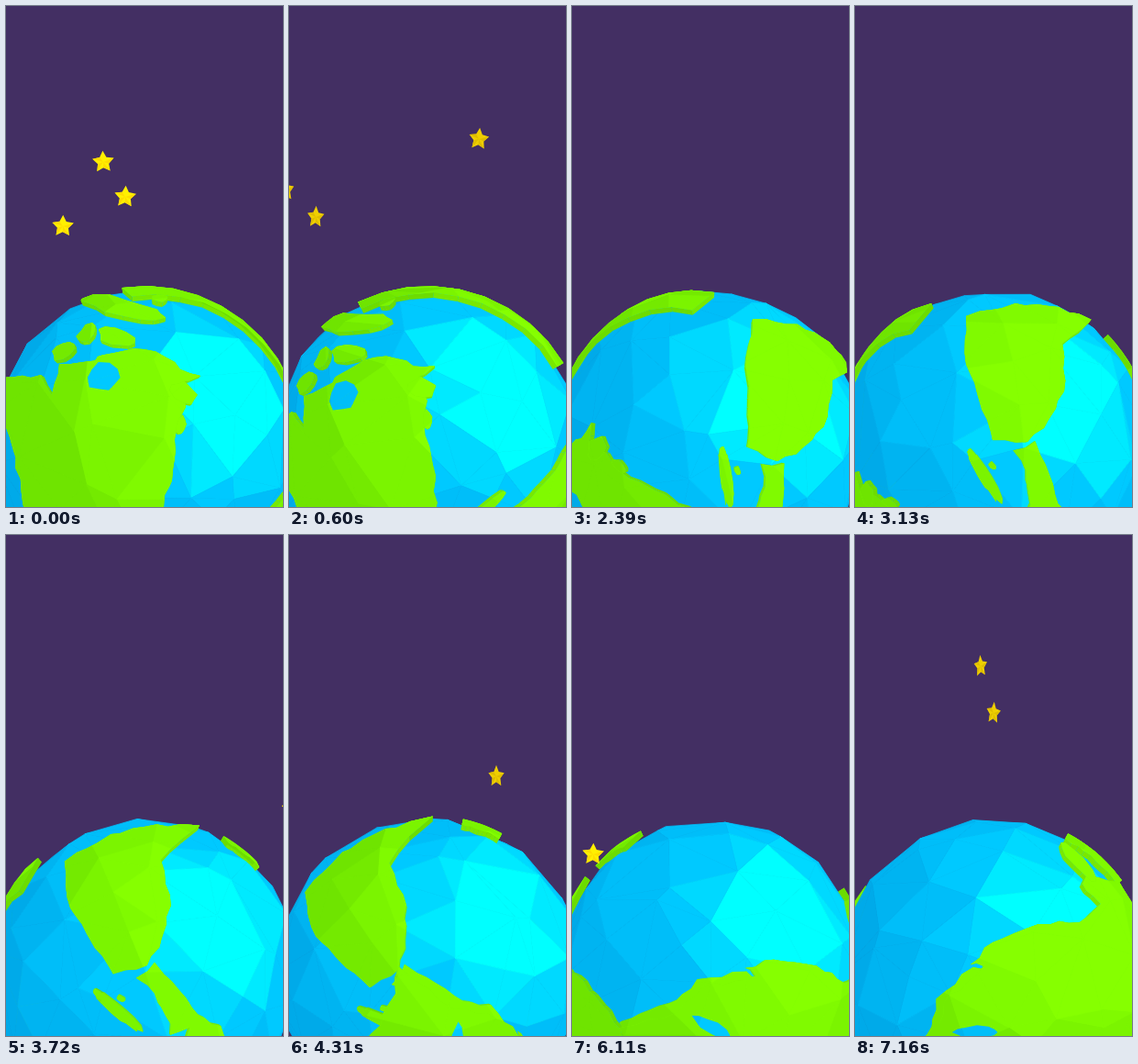
Write an HTML page with a canvas that moves like this. It is 302 by 546 pixels and loops after 7.26 s.

```html
<!DOCTYPE html>
<html lang="en">
<head>
<meta charset="utf-8">
<title>Spinning globe</title>
<style>
html, body { margin: 0; width: 100%; height: 100%; overflow: hidden; background: #432f63; }
canvas { display: block; width: 302px; height: 546px; }
</style>
</head>
<body>
<canvas id="stage" width="302" height="546"></canvas>
<script>
const ctx = document.getElementById('stage').getContext('2d');
const LOOP = 7260, SPIN = 0.0006004, REACH = 3200;
const CX = 151, CY = 478, SEA = 169, LAND = 173;
const AXIS = [0, -0.53, 0.848], LIGHT = [0.53, 0.36, 0.77];

const SEA_TONES = [[0.92, '#00ffff'], [0.86, '#00eaff'], [0.78, '#00d9ff'], [0.62, '#00c9ff'],
  [0.32, '#00bef9'], [0, '#00b4f1'], [-9, '#00aae9']];
const LAND_TONES = [[0.82, '#86ff00'], [0.7, '#80fa00'], [0.5, '#7bf400'], [0.3, '#74ea00'], [-9, '#6fe400']];

let seed = 11;
const rand = () => (seed = (seed * 16807) % 2147483647) / 2147483647;
const wobble = size => (rand() - 0.5) * size;
const range = n => [...Array(n).keys()];
const dot = (a, b) => a[0] * b[0] + a[1] * b[1] + a[2] * b[2];
const cross = (a, b) => [a[1] * b[2] - a[2] * b[1], a[2] * b[0] - a[0] * b[2], a[0] * b[1] - a[1] * b[0]];
const sub = (a, b) => a.map((v, i) => v - b[i]);
const unit = a => { const l = Math.hypot(...a); return a.map(v => v / l); };
const tone = (tones, d) => tones.find(t => d > t[0])[1];

function turn(p, angle) {
  const c = Math.cos(angle), s = Math.sin(angle), k = dot(AXIS, p) * (1 - c), q = cross(AXIS, p);
  return p.map((v, i) => v * c + q[i] * s + AXIS[i] * k);
}

// Convex hull of jittered points: the facets of the globe
function facets(count, jitter) {
  const faces = [];
  const pts = range(count).map(i => {
    const y = 1 - 2 * (i + 0.5) / count, r = Math.sqrt(1 - y * y), a = i * 2.39996;
    return unit([r * Math.cos(a), y, r * Math.sin(a)].map(v => v + wobble(jitter)));
  });
  for (let i = 0; i < count; i++)
    for (let j = i + 1; j < count; j++) {
      if (dot(pts[i], pts[j]) < 0.4) continue;
      for (let k = j + 1; k < count; k++) {
        if (dot(pts[i], pts[k]) < 0.4) continue;
        let n = unit(cross(sub(pts[j], pts[i]), sub(pts[k], pts[i])));
        if (dot(n, pts[i]) < 0) n = n.map(v => -v);
        const d = dot(n, pts[i]) + 1e-9;
        if (pts.every(p => dot(n, p) <= d)) faces.push({ n, pts: [pts[i], pts[j], pts[k]] });
      }
    }
  return faces;
}
const mesh = facets(105, 0.24);

// Lifts a screen outline, as seen at a given time, onto the sphere
function lift(at, outline) {
  const pts = outline.map(([x, y]) => {
    const a = (x - CX) / LAND, b = (CY - y) / LAND;
    return turn(unit([a, b, Math.sqrt(Math.max(0, 1 - a * a - b * b))]), -SPIN * at);
  });
  return { at, pts };
}

// Ragged coast through a few key points
function coast(at, ...keys) {
  const outline = [];
  keys.forEach(([x, y], i) => {
    const [u, v] = keys[(i + 1) % keys.length];
    const parts = Math.ceil(Math.hypot(u - x, v - y) / 14);
    outline.push([x, y]);
    for (let j = 1; j < parts; j++)
      outline.push([x + (u - x) * j / parts + wobble(5), y + (v - y) * j / parts + wobble(5)]);
  });
  return lift(at, outline);
}

// Ragged ellipse
function isle(at, x, y, long, short, tilt = 0) {
  const n = Math.round(7 + long / 5);
  return lift(at, range(n).map(i => {
    const a = i / n * 2 * Math.PI, r = 1 + wobble(0.4);
    const u = Math.cos(a) * long * r, v = Math.sin(a) * short * r;
    return [x + u * Math.cos(tilt) - v * Math.sin(tilt), y + u * Math.sin(tilt) + v * Math.cos(tilt)];
  }));
}

// Thin land along the horizon between two angles in degrees
function edge(at, from, to, depth) {
  const n = 10;
  const arc = r => range(n).map(i => {
    const a = (from + (to - from) * i / (n - 1)) * Math.PI / 180;
    const d = r * (1 + wobble(0.012));
    return [CX + Math.cos(a) * d, CY - Math.sin(a) * d];
  });
  return lift(at, [...arc(LAND * (1 - depth)), ...arc(LAND * 1.02).reverse()]);
}

const lands = [
  coast(0, [-5, 405], [38, 402], [50, 424], [58, 390], [84, 388], [118, 378], [150, 374], [184, 388], [190, 396],
    [212, 403], [194, 409], [196, 437], [186, 462], [182, 505], [172, 546], [150, 620], [40, 600], [18, 540], [4, 470]),
  isle(0, 125, 327, 50, 9, 0.25),
  isle(0, 62, 375, 14, 8, -0.5),
  isle(0, 88, 356, 13, 7, -0.7),
  isle(0, 120, 361, 20, 9, 0.3),
  isle(0, 98, 396, 14, 4, 1.9),
  isle(0, 169, 318, 9, 4),
  edge(600, 116, 31, 0.045),
  coast(3130, [121, 338], [175, 324], [222, 328], [258, 341], [226, 368], [228, 420], [206, 460], [188, 475],
    [150, 473], [136, 432], [121, 390]),
  isle(3130, 137, 507, 32, 5, 1.1),
  isle(3130, 150, 501, 5, 3, 0.8),
  isle(3130, 13, 532, 13, 7, 1.5),
  isle(3130, 38, 542, 9, 4, 0.5),
  coast(4310, [112, 490], [126, 468], [150, 482], [190, 508], [220, 512], [250, 546], [240, 600], [195, 600],
    [186, 524], [168, 538], [156, 520], [136, 500]),
  isle(4310, 106, 530, 32, 6, 0.4),
  edge(4310, 77, 62, 0.035),
  coast(7160, [92, 546], [97, 510], [140, 470], [126, 468], [150, 444], [200, 424], [245, 422], [268, 402],
    [248, 380], [252, 372], [288, 378], [318, 430], [300, 590], [200, 640], [60, 590]),
  edge(7160, 62, 36, 0.04),
  isle(7160, 244, 357, 26, 6, 0.85)
];
const lakes = [
  isle(0, 107, 405, 17, 15),
  isle(7160, 133, 542, 24, 7)
];

// Stars: time seen, offset from the globe's centre, own spin, tilt
const stars = [
  [0, [-21, 270, 115], 0, 0.05], [0, [-45, 308, 108], 0.05, -0.05], [0, [-89, 238, 100], 0, 0.02],
  [600, [56, 333, 130], 0.4, 0.1], [4310, [75, 215, 150], 0.75, 0], [6110, [-128, 130, 290], 0, 0.03],
  [7160, [-14, 335, 120], 0.92, -0.08], [7160, [0, 284, 120], 0.86, 0.1]
];

function trace(points) {
  ctx.beginPath();
  points.forEach(([x, y]) => ctx.lineTo(x, y));
  ctx.closePath();
}
function fill(points, color) {
  trace(points);
  ctx.fillStyle = color;
  ctx.fill();
}
const place = (p, r) => [CX + p[0] * r, CY - p[1] * r];
// Like place, but points behind the horizon stop on it
function rim(p, r) {
  if (p[2] >= 0) return place(p, r);
  const l = Math.hypot(p[0], p[1]) || 1;
  return place([p[0] / l, p[1] / l], r);
}

function paint(faces, r, tones) {
  ctx.lineWidth = 0.8;
  for (const f of faces) {
    const color = tone(tones, f.light);
    fill(f.pts.map(p => place(p, r)), color);
    ctx.strokeStyle = color;
    ctx.stroke();
  }
}
function paintInside(shape, faces, r, tones) {
  ctx.save();
  trace(shape.map(p => rim(p, LAND)));
  ctx.clip();
  paint(faces, r, tones);
  ctx.restore();
}

function walls(shape, project) {
  shape.forEach((p, i) => {
    const q = shape[(i + 1) % shape.length];
    const color = dot(p, LIGHT) > 0.55 ? '#78e800' : '#6cdc00';
    fill([project(p, SEA - 2), project(q, SEA - 2), project(q, LAND), project(p, LAND)], color);
  });
}

function star([at, home, spin, tilt], t) {
  if (Math.abs(t - at) > 1500) return;
  const [x, y] = turn(home, SPIN * (t - at));
  const c = Math.abs(Math.cos(spin + (t - at) * 0.00113));
  const tones = c > 0.94 ? ['#fff000', '#ffdc00'] : ['#efcf00', '#dfbd00'];
  const tip = i => {
    const r = i % 2 ? 6.3 : 12.3, b = i * Math.PI / 5 + tilt;
    return [CX + x + Math.sin(b) * r * Math.max(0.3, c), CY - y - Math.cos(b) * r];
  };
  fill(range(10).map(tip), tones[0]);
  for (const i of [2, 4, 6, 8]) fill([[CX + x, CY - y], tip(i), tip(i + 1)], tones[1]);
}

function draw(t) {
  const spin = SPIN * t;
  ctx.fillStyle = '#432f63';
  ctx.fillRect(0, 0, 302, 546);

  const front = mesh
    .map(f => ({ n: turn(f.n, spin), pts: f.pts.map(p => turn(p, spin)) }))
    .filter(f => f.n[2] > -0.12)
    .map(f => ({ ...f, light: dot(f.n, LIGHT) }));
  const sea = front.filter(f => f.n[2] > 0);
  const near = list => list.filter(s => Math.abs(t - s.at) < REACH).map(s => s.pts.map(p => turn(p, spin)));
  const facing = s => s.some(p => p[2] > 0);
  const ground = near(lands);

  // Raised land peeking over the horizon, then the sea in front of it
  for (const g of ground) {
    walls(g, place);
    fill(g.map(p => place(p, LAND)), '#78ee00');
  }
  paint(sea, SEA, SEA_TONES);

  const seen = ground.filter(facing);
  seen.forEach(g => walls(g, rim));
  for (const g of seen) {
    fill(g.map(p => rim(p, LAND)), '#7bf400');
    paintInside(g, front, LAND + 2, LAND_TONES);
  }
  near(lakes).filter(facing).forEach(g => paintInside(g, sea, SEA, SEA_TONES));
  stars.forEach(s => star(s, t));
}

// Held poses: 150 ms each, four of them 10 ms shorter
const times = range(49).map(i => 150 * i - 10 * [14, 19, 22, 27].filter(k => i >= k).length);
const start = performance.now();
let shown = -1;
function tick() {
  const t = Math.max(0, performance.now() - start) % LOOP;
  const pose = times.filter(v => v <= t).pop();
  if (pose !== shown) draw(shown = pose);
  requestAnimationFrame(tick);
}
tick();
</script>
</body>
</html>
```
